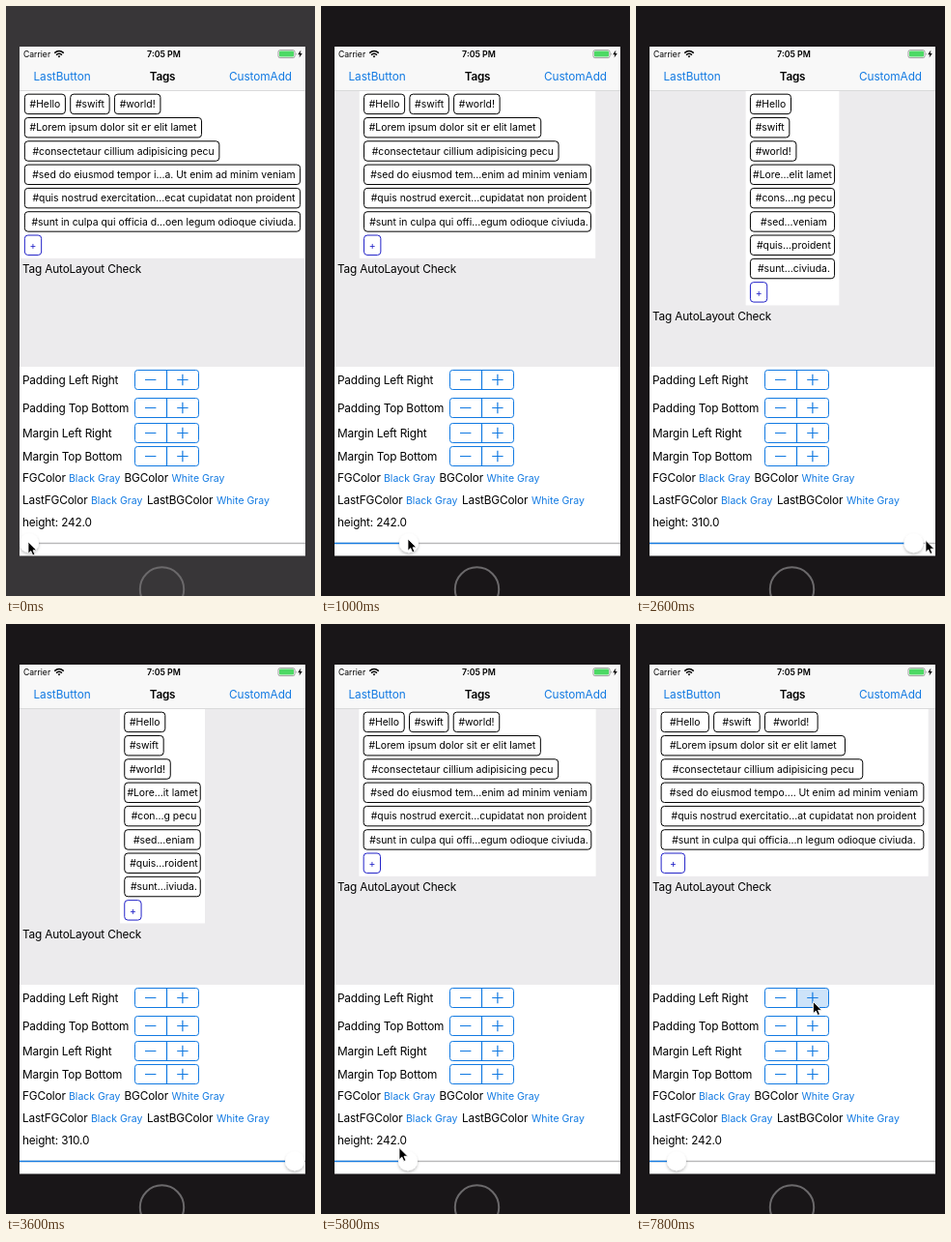
These frames come from a looping animation (320x610 px, 8000 ms). An HTML page:

```html
<!DOCTYPE html>
<html lang="en">
<head>
<meta charset="utf-8">
<title>Tags</title>
<style>
  html, body { margin: 0; width: 100%; height: 100%; overflow: hidden; background: #191618; }
  svg { display: block; width: 100%; height: 100%; }
  text { font-family: Inter, Roboto, sans-serif; white-space: pre; }
  .label { font-size: 11.8px; letter-spacing: -.16px; fill: #000; }
  .link { font-size: 10.5px; fill: #127ae2; }
  .nav { font-size: 11.8px; letter-spacing: -.05px; fill: #127ae2; }
  .tag { font-size: 10.4px; text-anchor: middle; }
  .line { fill: none; stroke: #127ae2; }
  #bezel { animation: focus 8s step-end infinite; }
  @keyframes focus { 0% { fill: #383638; } 2.5%, 100% { fill: #191618; } }
</style>
</head>
<body>
<svg viewBox="0 0 320 610">
  <defs>
    <filter id="shadow" x="-50%" y="-50%" width="200%" height="200%">
      <feDropShadow dx="0" dy="1.8" stdDeviation="1.6" flood-opacity=".25"/>
    </filter>
    <clipPath id="screen"><path d="M14 42H310V568.5H14Z"/></clipPath>
  </defs>
  <rect id="bezel" width="320" height="610"/>
  <circle cx="161.5" cy="603" r="22.7" fill="none" stroke="#6b696b" stroke-width="2"/>

  <g clip-path="url(#screen)">
    <rect x="14" y="42" width="296" height="527" fill="#fff"/>
    <rect x="14" y="88" width="296" height="285" fill="#ecebed"/>
    <rect id="box" y="87.8" fill="#fff"/>
    <g id="tags"></g>
    <rect x="14" y="42" width="296" height="45.6" fill="#f8f8f8"/>
    <rect x="14" y="87.3" width="296" height=".6" fill="#c4c4c6"/>

    <text x="18" y="53" font-size="8.6">Carrier</text>
    <g fill="none" stroke="#000" stroke-width="1.4">
      <path d="M50.2 48.6Q55 44.4 59.8 48.6M52 50.6Q55 48 58 50.6"/>
      <path d="M53.6 51.8Q55 50.8 56.4 51.8L55 53.4Z" fill="#000" stroke="none"/>
    </g>
    <text x="163.5" y="53" font-size="8.8" font-weight="600" text-anchor="middle">7:05 PM</text>
    <rect x="282" y="45.6" width="17" height="8" rx="1.8" fill="#fff" stroke="#777" stroke-width=".7"/>
    <rect x="283" y="46.6" width="15" height="6" rx="1" fill="#4cd964"/>
    <path d="M300 48.2Q301.4 49.6 300 51Z" fill="#777"/>
    <path d="M305.4 45.6L302.2 50.2H304.3L303.6 53.6L306.8 49H304.7Z"/>

    <text class="nav" x="28.5" y="76.7">LastButton</text>
    <text x="162" y="76.7" font-size="11.7" font-weight="600" letter-spacing="-.2" text-anchor="middle">Tags</text>
    <text class="nav" x="296" y="76.7" text-anchor="end">CustomAdd</text>

    <text class="label" id="check" x="17">Tag AutoLayout Check</text>
    <rect id="pressed" x="166.5" y="376.5" width="33" height="20" rx="2.5" fill="#cde3f9"/>
    <g id="controls"></g>
    <text class="label" id="height" x="17" y="538.1"></text>

    <rect x="14" y="554.8" width="296" height="1.4" fill="#b7b7b9"/>
    <rect id="track" x="14" y="554.8" height="1.4" fill="#127ae2"/>
    <circle id="thumb" cy="555.3" r="10" fill="#fff" filter="url(#shadow)"/>
  </g>
  <path id="cursor" d="M0 0V12.2L2.8 9.6L4.8 14L6.9 13L5 8.8H8.8Z" stroke="#fff" stroke-width=".8"/>
</svg>
<script>
const LOOP = 8000, STEP = 200, PT = 0.715;
const BASE_PADDING = 8, MARGIN = 6, GAP = 4, TAG_HEIGHT = 30;
const BOX_TOP = 87.8;
const $ = id => document.getElementById(id);

const words = ['#Hello', '#swift', '#world!', '#Lorem ipsum dolor sit er elit lamet',
  ' #consectetaur cillium adipisicing pecu',
  ' #sed do eiusmod tempor incididunt ut labore et dolore magna aliqua. Ut enim ad minim veniam',
  ' #quis nostrud exercitation ullamco laboris nisi ut aliquip ex ea commodo consequat. Duis aute irure dolor in reprehenderit in voluptate velit esse cillum dolore eu fugiat nulla pariatur. Excepteur sint occaecat cupidatat non proident',
  ' #sunt in culpa qui officia deserunt mollit anim id est laborum. Nam liber te conscient to factor tum poen legum odioque civiuda.',
  '+'];

// Knots are [time, x] or [time, x, y].
const thumbPath = [[0, 24], [200, 29], [400, 41], [1000, 91], [1800, 208], [2000, 233],
  [2400, 276], [2800, 299], [3600, 299], [3800, 294], [4000, 274], [4800, 174], [5800, 90],
  [6000, 74], [6400, 49], [6600, 42]];
const cursorPath = [[0, 23, 554], [1000, 90, 551], [1800, 218, 551], [2400, 286, 552],
  [2800, 314, 553], [3000, 332, 553], [3600, 332, 551], [3800, 308, 549], [4000, 284, 548],
  [4800, 181, 545.5], [5800, 81, 541.5], [6400, 39, 543], [6600, 38, 546], [7200, 183.5, 390.5]];
const paddingPath = [[7200, 0], [7400, 2], [7600, 3], [7800, 5]];

function at(path, time) {
  const i = path.findIndex(knot => knot[0] > time);
  if (i < 0) return path[path.length - 1].slice(1);
  if (i === 0) return path[0].slice(1);
  const a = path[i - 1], b = path[i], k = (time - a[0]) / (b[0] - a[0]);
  return a.slice(1).map((v, n) => v + (b[n + 1] - v) * k);
}

function add(parent, name, attrs, content = '') {
  const node = document.createElementNS('http://www.w3.org/2000/svg', name);
  set(node, attrs);
  node.textContent = content;
  return parent.appendChild(node);
}
function set(node, attrs) {
  for (const key in attrs) node.setAttribute(key, attrs[key]);
}

const pen = document.createElement('canvas').getContext('2d');
function measure(text) {
  pen.font = '10.4px Inter, Roboto, sans-serif';
  return pen.measureText(text).width;
}

// The head takes about half the room, the tail whatever remains.
function truncateMiddle(text, width) {
  if (measure(text) <= width + 0.1) return text;
  const room = width - measure('...');
  let head = 0, tail = text.length;
  while (measure(text.slice(0, head + 1)) <= room / 2 + 2) head++;
  const rest = room + 6.4 - measure(text.slice(0, head));
  while (tail > head && measure(text.slice(tail - 1)) <= rest) tail--;
  return text.slice(0, head).trimEnd() + '...' + text.slice(tail).trimStart();
}

function drawTags(left, width, padding) {
  const group = $('tags'), margin = MARGIN * PT, max = width - 2 * margin;
  group.replaceChildren();
  let x = 0, row = 0;
  words.forEach((word, i) => {
    const last = i === words.length - 1;
    const w = Math.min(max, measure(word) + 2 * padding);
    if (x > 0 && (x + w > max + 0.1 || last)) { x = 0; row++; }
    const tagX = left + margin + x;
    const tagY = BOX_TOP + (GAP + row * (TAG_HEIGHT + GAP)) * PT;
    const color = last ? '#2222c8' : '#000';
    add(group, 'rect', { x: tagX + .5, y: tagY + .5, width: w - 1, height: TAG_HEIGHT * PT - 1,
      rx: 3.4, fill: '#fff', stroke: color, 'stroke-width': 1 });
    add(group, 'text', { class: 'tag', x: tagX + w / 2, y: tagY + 14.5, fill: color },
      truncateMiddle(word, w - 2 * padding));
    x += w + margin;
  });
  return (row + 1) * (TAG_HEIGHT + GAP) + GAP;
}

const controls = $('controls');
[['Padding Left Right', 386.5], ['Padding Top Bottom', 415.5],
 ['Margin Left Right', 441.5], ['Margin Top Bottom', 465.5]].forEach(([name, y]) => {
  add(controls, 'text', { class: 'label', x: 17, y: y + 4 }, name);
  add(controls, 'rect', { class: 'line', x: 133.5, y: y - 10, width: 66, height: 20, rx: 2.8 });
  add(controls, 'path', { class: 'line', 'stroke-width': 1.2,
    d: `M166.5 ${y - 10}v20M144 ${y}h11.4M177.2 ${y}h11.4M182.9 ${y - 5.7}v11.4` });
});
[['FGColor', 17, 'Black Gray', 65, 492.3], ['BGColor', 122.5, 'White Gray', 171.5, 492.3],
 ['LastFGColor', 17, 'Black Gray', 88, 515.3], ['LastBGColor', 146, 'White Gray', 218, 515.3],
].forEach(([name, x, link, linkX, y]) => {
  add(controls, 'text', { class: 'label', x, y }, name);
  add(controls, 'text', { class: 'link', x: linkX, y: y - .3 }, link);
});

function render(time) {
  const [thumb] = at(thumbPath, time), [cx, cy] = at(cursorPath, time);
  const [extra] = at(paddingPath, time);
  const inset = (thumb - 22.5) * 0.376, left = 14 + inset, width = 296 - 2 * inset;
  const height = drawTags(left, width, (BASE_PADDING + extra) * PT);
  set($('box'), { x: left, width, height: height * PT });
  set($('check'), { y: BOX_TOP + height * PT + 15.2 });
  $('height').textContent = `height: ${height.toFixed(1)}`;
  set($('track'), { width: thumb - 14 });
  set($('thumb'), { cx: thumb });
  set($('cursor'), { transform: `translate(${cx} ${cy})` });
  $('pressed').style.display = extra > 0 ? '' : 'none';
}

let shown = -1;
function tick() {
  const step = Math.floor(performance.now() % LOOP / STEP);
  if (step !== shown) render((shown = step) * STEP);
  requestAnimationFrame(tick);
}
tick();
</script>
</body>
</html>
```
